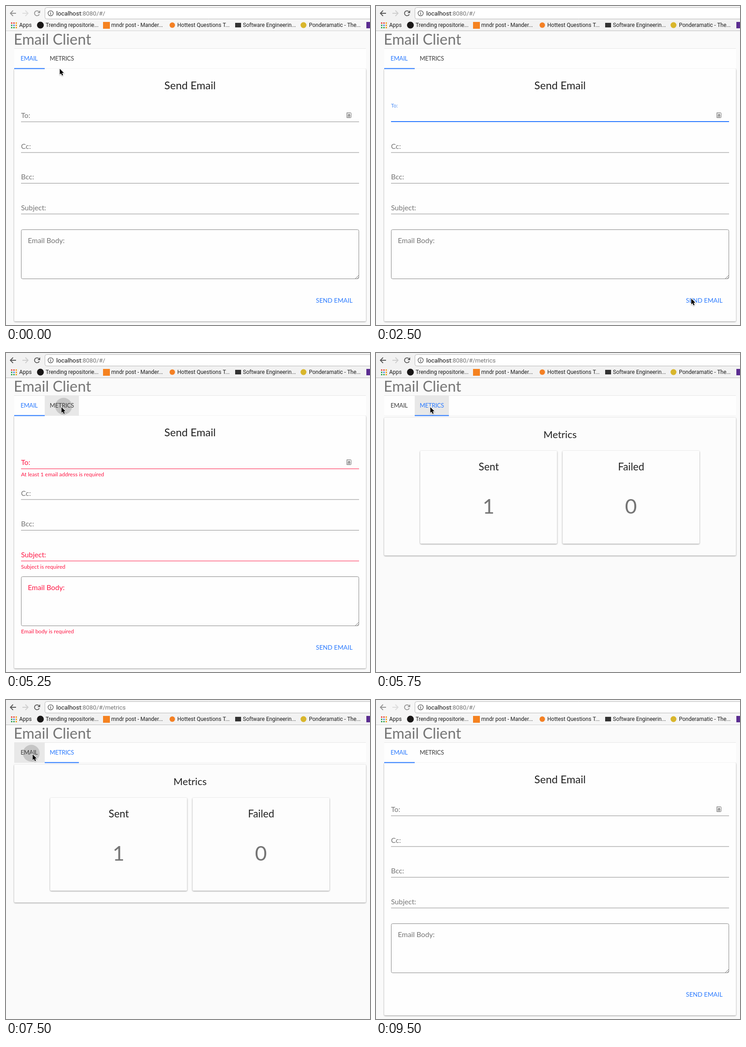
An HTML page with a canvas for the animation above (9.75 s loop, 799x701 px).

```html
<!DOCTYPE html>
<html lang="en">
<head>
<meta charset="utf-8">
<title>Email Client</title>
<style>
html, body { margin: 0; width: 100%; height: 100%; overflow: hidden; background: #fafafa; }
canvas { display: block; }
</style>
</head>
<body>
<canvas id="stage" width="799" height="701"></canvas>
<script>
const ctx = document.getElementById('stage').getContext('2d');
const LOOP = 9750, STEP = 250;
const BLUE = '#2979ff', RED = '#ff1744', INK = '#212121', GRAY = '#757575', LINE = '#8c8c8c';
const UI = 'Lato, sans-serif', CHROME = 'Roboto, sans-serif';

// Pointer tip: time, x, y
const PATH = [
  [0, 118, 138], [250, 84, 134], [500, 47, 125], [1000, 110, 190], [1250, 190, 238],
  [1500, 190, 238], [1750, 430, 440], [2000, 672, 617], [2250, 690, 640], [2500, 692, 643],
  [3250, 692, 643], [3500, 672, 648], [3750, 343, 352], [4000, 190, 215], [4250, 130, 158],
  [4500, 112, 141], [4750, 120, 125], [5000, 123, 119], [6000, 118, 119], [6250, 98, 120],
  [6500, 74, 120], [6750, 62, 119], [7000, 58, 119], [8000, 59, 120]
];

function pointerAt(t) {
  const i = PATH.findIndex(p => p[0] > t);
  if (i < 0) return PATH[PATH.length - 1].slice(1);
  const [t0, x0, y0] = PATH[i - 1], [t1, x1, y1] = PATH[i];
  // the pointer rests on the tab before it sets off
  const k = t0 === 500 ? 0 : (t - t0) / (t1 - t0);
  return [x0 + (x1 - x0) * k, y0 + (y1 - y0) * k];
}

function rect(x, y, w, h, color) {
  ctx.fillStyle = color;
  ctx.fillRect(x, y, w, h);
}

function disc(x, y, r, color) {
  ctx.fillStyle = color;
  ctx.beginPath();
  ctx.arc(x, y, r, 0, 7);
  ctx.fill();
}

function rounded(x, y, w, h, r, fill, stroke) {
  ctx.beginPath();
  ctx.roundRect(x, y, w, h, r);
  if (fill) { ctx.fillStyle = fill; ctx.fill(); }
  if (stroke) { ctx.strokeStyle = stroke; ctx.lineWidth = 1; ctx.stroke(); }
}

function lines(color, width, ...paths) {
  ctx.strokeStyle = color;
  ctx.lineWidth = width;
  ctx.beginPath();
  for (const [x, y, ...rest] of paths) {
    ctx.moveTo(x, y);
    for (let i = 0; i < rest.length; i += 2) ctx.lineTo(rest[i], rest[i + 1]);
  }
  ctx.stroke();
}

function text(str, x, y, size, color, { font = UI, align = 'left', spacing = 0 } = {}) {
  ctx.font = `${size}px ${font}`;
  ctx.textAlign = align;
  ctx.letterSpacing = spacing + 'px';
  ctx.fillStyle = color;
  ctx.fillText(str, x, y);
}

function card(x, y, w, h, color) {
  ctx.save();
  ctx.shadowColor = 'rgba(0,0,0,.42)';
  ctx.shadowBlur = 3;
  ctx.shadowOffsetY = 1;
  rounded(x, y, w, h, 2, color);
  ctx.restore();
}

function drawToolbar(active, url) {
  rect(0, 0, 799, 55, active ? '#f2f2f2' : '#f6f6f6');
  rect(0, 54, 799, 1, active ? '#bdbdbd' : '#d0d0d0');
  const icon = active ? '#555' : '#929292';
  lines(icon, 1.8, [22, 16, 10, 16], [15.5, 10, 9.5, 16, 15.5, 22]);
  lines(active ? '#cdcdcd' : '#dcdcdc', 1.8, [36, 16, 48, 16], [42.5, 10, 48.5, 16, 42.5, 22]);
  ctx.strokeStyle = icon;
  ctx.beginPath();
  ctx.arc(68, 16, 5.4, 0.4, 5.5);
  ctx.stroke();
  ctx.fillStyle = icon;
  ctx.beginPath();
  ctx.moveTo(75, 9.5);
  ctx.lineTo(75, 15.5);
  ctx.lineTo(69, 15.5);
  ctx.fill();

  rounded(85.5, 3.5, 730, 25, 4, '#fff', '#b8b8b8');
  ctx.strokeStyle = '#555';
  ctx.lineWidth = 1.3;
  ctx.beginPath();
  ctx.arc(98, 16, 5.7, 0, 7);
  ctx.stroke();
  rect(97.3, 12.6, 1.5, 1.6, '#555');
  rect(97.3, 15.2, 1.5, 4.2, '#555');
  text('localhost', 110.3, 20.5, 13.4, '#111', { font: CHROME });
  text(url, 110.3 + ctx.measureText('localhost').width, 20.5, 13.4, '#707070', { font: CHROME });

  const dots = ['#e8453c', '#e8453c', '#f0a020', '#3aa757', '#4285f4', '#f0a020', '#3aa757', '#3aa757', '#f0a020'];
  dots.forEach((c, i) => rect(11 + i % 3 * 5, 36 + (i / 3 | 0) * 5, 3, 3, c));
  disc(75.5, 42, 7.5, '#191717');
  rect(213, 35, 15, 15, '#f58220');
  disc(365, 42, 6, '#f48024');
  rect(503, 37, 13, 10, '#333');
  disc(653, 42, 6.5, '#d9b62c');
  rect(791, 35, 8, 14, '#5b2d91');
  const bookmarks = [['Apps', 29], ['Trending repositorie...', 87], ['mndr post - Mander...', 231],
    ['Hottest Questions T...', 376], ['Software Engineerin...', 520], ['Ponderamatic - The...', 665]];
  for (const [label, x] of bookmarks) text(label, x, 46, 12, '#1c1c1c', { font: CHROME });
}

function drawTabs(s) {
  rect(18, 93, 772, 45, '#fefefe');
  rect(18, 93, 772, 1, '#e6e6e6');
  rect(18, 137, 772, 1, '#f3f3f3');
  const tabs = [['EMAIL', 18, 67, 32], ['METRICS', 85, 75, 96]];
  tabs.forEach(([label, x, w, tx], i) => {
    if (s.hover === i) rect(x, 94, w, 44, s.pressed ? '#d4d4d4' : '#e8e8e8');
    if (s.ripple && s.hover === i) {
      ctx.save();
      ctx.beginPath();
      ctx.rect(x, 94, w, 44);
      ctx.clip();
      disc(x + w / 2 + 4, 117, 18.5, '#c5c5c5');
      ctx.restore();
    }
    text(label, tx, 120, 13, s.tab === i ? BLUE : '#3c3c3c', { spacing: -0.25 });
  });
  rect(s.bar[0], 136.5, s.bar[1], 2, BLUE);
}

function drawField(label, y, error, focused) {
  const color = focused ? BLUE : error ? RED : LINE;
  if (focused) text(label, 33, y - 31, 11.5, '#4a8cf5');
  else text(label, 33, y - 8, 15.7, error ? RED : GRAY);
  rect(33, focused ? y - 1 : y, 742, focused ? 2 : 1, color);
  if (error) text(error, 33, y + 17, 12, RED);
}

function drawAutofill() {
  rounded(748.5, 234.5, 9, 11, 1, '#f4f4f4', '#6f6f6f');
  rect(747.8, 234, 1.4, 12, '#777');
  disc(753, 238.2, 1.5, '#666');
  rect(750.5, 240.3, 5, 1.8, '#666');
  rect(750.5, 243.2, 5, 1, '#777');
}

function drawForm(s) {
  card(18, 138, 772, 555, '#fefefe');
  text('Send Email', 404, 183, 23.5, INK, { align: 'center' });
  drawField('To:', 254, s.toError && 'At least 1 email address is required', s.focused);
  drawField('Cc:', 321.5);
  drawField('Bcc:', 389);
  drawField('Subject:', 456.5, s.errors && 'Subject is required');
  if (s.autofill) drawAutofill();

  if (s.entering) {
    for (const x of [33, 774]) for (const y of [491, 599]) rect(x, y, 1, 1, '#aaa');
  } else {
    rounded(33.5, 491.5, 741, 108, 3, null, '#858585');
  }
  lines('#666', 1, [767, 599, 774, 592], [771, 599, 774, 596]);
  text('Email Body:', s.entering ? 39 : 48, s.entering ? 524 : 520.5, 15.7, s.errors ? RED : GRAY);
  if (s.errors) text('Email body is required', 33, 616, 12, RED);

  if (s.button) rounded(673, 630, 94, 33, 2, s.button);
  if (s.buttonRipple) disc(697, 647, 15, '#c3d9ff');
  text('SEND EMAIL', 720.5, 651.5, 13.7, BLUE, { align: 'center' });
}

function drawMetrics() {
  card(18, 142, 772, 303, '#fcfcfc');
  text('Metrics', 404, 187, 22, INK, { align: 'center' });
  for (const [label, count, x] of [['Sent', 1, 97], ['Failed', 0, 409.5]]) {
    card(x, 215, 300.5, 204, '#fdfdfd');
    text(label, x + 150.5, 258, 22.5, INK, { align: 'center' });
    text(count, x + 150, 352.5, 45, GRAY, { align: 'center' });
  }
}

function drawPointer([x, y]) {
  ctx.save();
  ctx.translate(x, y);
  ctx.shadowColor = 'rgba(0,0,0,.3)';
  ctx.shadowBlur = 2;
  ctx.shadowOffsetY = 1;
  ctx.beginPath();
  [[0, 0], [0, 12.5], [2.9, 9.9], [5, 14.8], [7.2, 13.8], [5.1, 9.1], [9, 9.1]]
    .forEach(p => ctx.lineTo(...p));
  ctx.closePath();
  ctx.strokeStyle = '#fff';
  ctx.lineWidth = 2;
  ctx.stroke();
  ctx.shadowColor = 'transparent';
  ctx.fillStyle = '#000';
  ctx.fill();
  ctx.restore();
}

function stateAt(t) {
  const within = (from, to) => t >= from && t < to;
  return {
    active: within(1250, 9500),
    metrics: within(5500, 7750),
    tab: within(5750, 8000) ? 1 : 0,
    bar: within(5500, 5750) ? [20, 67] : within(5750, 7750) ? [85, 75]
      : within(7750, 8000) ? [83, 67] : [18, 67],
    hover: within(4750, 6500) ? 1 : within(6500, 8250) ? 0 : -1,
    ripple: t === 5250 || t === 7500,
    pressed: t === 5500 || t === 7750,
    focused: within(1250, 2750),
    toError: within(2750, 5500),
    errors: within(3000, 5500),
    button: within(2750, 3000) ? '#f4f8ff' : within(3000, 3500) ? '#dfeaff'
      : within(3500, 5000) && '#ebf2ff',
    buttonRipple: t === 3000,
    autofill: !within(7750, 8750),
    entering: t === 7750
  };
}

function draw(now) {
  const t = Math.floor(now % LOOP / STEP) * STEP;
  const s = stateAt(t);
  rect(0, 0, 799, 701, '#fafafa');
  text('Email Client', 17, 84.5, 32.7, GRAY);
  if (s.metrics) drawMetrics(); else drawForm(s);
  drawTabs(s);
  drawToolbar(s.active, s.metrics ? ':8080/#/metrics' : ':8080/#/');
  if (t < 8250) drawPointer(pointerAt(t));
}

const start = performance.now();
function tick() {
  draw(performance.now() - start);
  requestAnimationFrame(tick);
}
tick();
</script>
</body>
</html>
```
